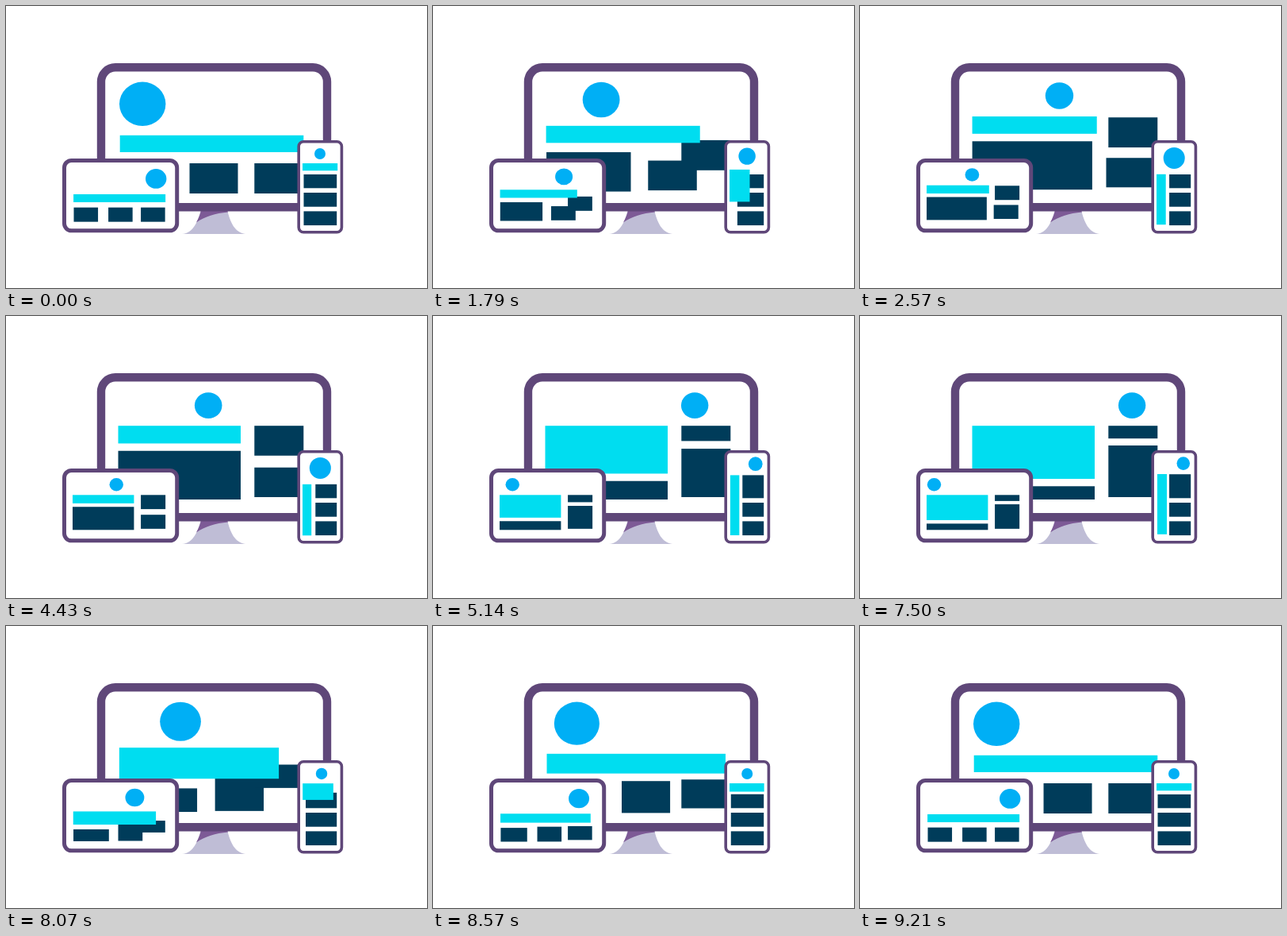
An HTML page with a canvas for the animation above (9.57 s loop, 531 by 355 pixels).

```html
<!DOCTYPE html>
<html lang="en">
<head>
<meta charset="utf-8">
<title>Responsive layouts</title>
<style>
  html, body { margin: 0; width: 531px; height: 355px; overflow: hidden; background: #fff; }
  canvas { display: block; }
</style>
</head>
<body>
<canvas width="531" height="355"></canvas>
<script>
const ctx = document.querySelector('canvas').getContext('2d');
const LOOP = 9570, FRAME = 1000 / 14;
const PURPLE = '#5f4779', NAVY = '#003c5a', CYAN = '#00ddf0', BLUE = '#00aff5';

// Page grid shared by the monitor and the tablet.
const LEFT = 141.5, SPLIT = 296, SIDE = 313.3, RIGHT = 375.3, TOP = 138.2;

// Every layout is three blocks and then a banner, each as [left, top, right, bottom].
const row = () => [
  ...[144.5, 231.5, SIDE].map(x => [x, 198, x + 61, 236]),
  [143.7, 162.8, RIGHT, 184]
];
const split = (bannerHeight, sideHeight, lowerTop) => [
  [LEFT, TOP + bannerHeight + 9.3, SPLIT, 231],
  [SIDE, lowerTop, RIGHT, 228],
  [SIDE, TOP, RIGHT, TOP + sideHeight],
  [LEFT, TOP, SPLIT, TOP + bannerHeight]
];
const stack = (left, firstTop, banner) => [
  ...[0, 1, 2].map(i => [left, i ? 211.6 + 23.4 * i : firstTop, 417.2, 229.3 + 23.4 * i]),
  banner
];

const pages = [row(), split(21.8, 37.8, 191), split(66.8, 16, 163)];
const shrinkX = x => 84 + (x - LEFT) * 0.501;
const shrinkY = y => 225.3 + (y - TOP) * 0.474;
const small = pages.map(page => page.map(([l, t, r, b]) =>
  [shrinkX(l), shrinkY(t), shrinkX(r), shrinkY(b)]));

// discs: [x, y, radius] in each layout; lastStart: when the move back to the first one begins.
const devices = [
  {
    frame: [120, 77.3, 285, 176], corner: 18, line: 10.4, layouts: pages,
    discs: [[172.2, 123.3, 29.2], [254.3, 112.6, 17.3], [343.1, 112.6, 17.2]], squash: 0.95,
    lastStart: 7635, discStart: 7530, duration: 1640
  },
  {
    frame: [73.5, 194.5, 142.2, 88.3], corner: 9, line: 5, layouts: small,
    discs: [[189.2, 217.4, 13.2], [139.7, 212.3, 8.7], [93.5, 212.3, 8.7]], squash: 0.94,
    lastStart: 7555, discStart: 7530, duration: 1640
  },
  {
    frame: [369.2, 170.8, 54.2, 114], corner: 6, line: 3.6,
    layouts: [
      stack(375.5, 212, [374, 198, 418.2, 207.3]),
      stack(390.3, 212, [374, 212, 385.2, 276.3]),
      stack(390.3, 199, [375, 199, 386.5, 276])
    ],
    discs: [[396, 186, 7], [396.2, 191.5, 13.6], [408, 185.6, 8.3]], squash: 1,
    lastStart: 7448, discStart: 7448, duration: 1450
  }
];

// Eased progress along cubic-bezier(.3, .1, 0, 1).
function ease(x) {
  if (x <= 0 || x >= 1) return x <= 0 ? 0 : 1;
  let lo = 0, hi = 1;
  for (let i = 0; i < 20; i++) {
    const s = (lo + hi) / 2;
    if (0.9 * s * (1 - s) ** 2 + s ** 3 < x) lo = s; else hi = s;
  }
  return 0.3 * lo * (1 - lo) ** 2 + 3 * lo * lo * (1 - lo) + lo ** 3;
}

const mix = (a, b, p) => a.map((v, i) => v + (b[i] - v) * p);

// Current pair of layouts and the progress between them.
function phase(time, lastStart, duration) {
  const starts = [1425, 4390, lastStart];
  const from = time < starts[1] ? 0 : time < lastStart ? 1 : 2;
  return { from, to: (from + 1) % 3, p: ease((time - starts[from]) / duration) };
}

function drawDevice(device, time) {
  const { layouts, discs, lastStart, discStart, duration } = device;
  ctx.beginPath();
  ctx.roundRect(...device.frame, device.corner);
  ctx.fillStyle = '#fff';
  ctx.fill();
  ctx.strokeStyle = PURPLE;
  ctx.lineWidth = device.line;
  ctx.stroke();

  const page = phase(time, lastStart, duration);
  layouts[page.from].forEach((box, i) => {
    const [l, t, r, b] = mix(box, layouts[page.to][i], page.p);
    ctx.fillStyle = i < 3 ? NAVY : CYAN;
    ctx.fillRect(l, t, r - l, b - t);
  });

  const disc = phase(time, discStart, duration);
  const [x, y, radius] = mix(discs[disc.from], discs[disc.to], disc.p);
  ctx.beginPath();
  ctx.ellipse(x, y, radius, radius * device.squash, 0, 0, 2 * Math.PI);
  ctx.fillStyle = BLUE;
  ctx.fill();
}

function fillPath(d, color) {
  ctx.fillStyle = color;
  ctx.fill(new Path2D(d));
}

function draw(now) {
  const time = Math.floor((now % LOOP) / FRAME + 0.07) * FRAME;
  ctx.fillStyle = '#fff';
  ctx.fillRect(0, 0, 531, 355);
  fillPath('M246 257C242 270 237 286 222 287H302C288 285 283 272 279 257Z', '#bfbdd6');
  fillPath('M246 257H279L280 259.5C264 261 251 265 240 272.5C243 267 245 262 246 257Z', '#7d5a96');
  devices.forEach(device => drawDevice(device, time));
}

const start = performance.now();
function tick() {
  draw(performance.now() - start);
  requestAnimationFrame(tick);
}
tick();
</script>
</body>
</html>
```
